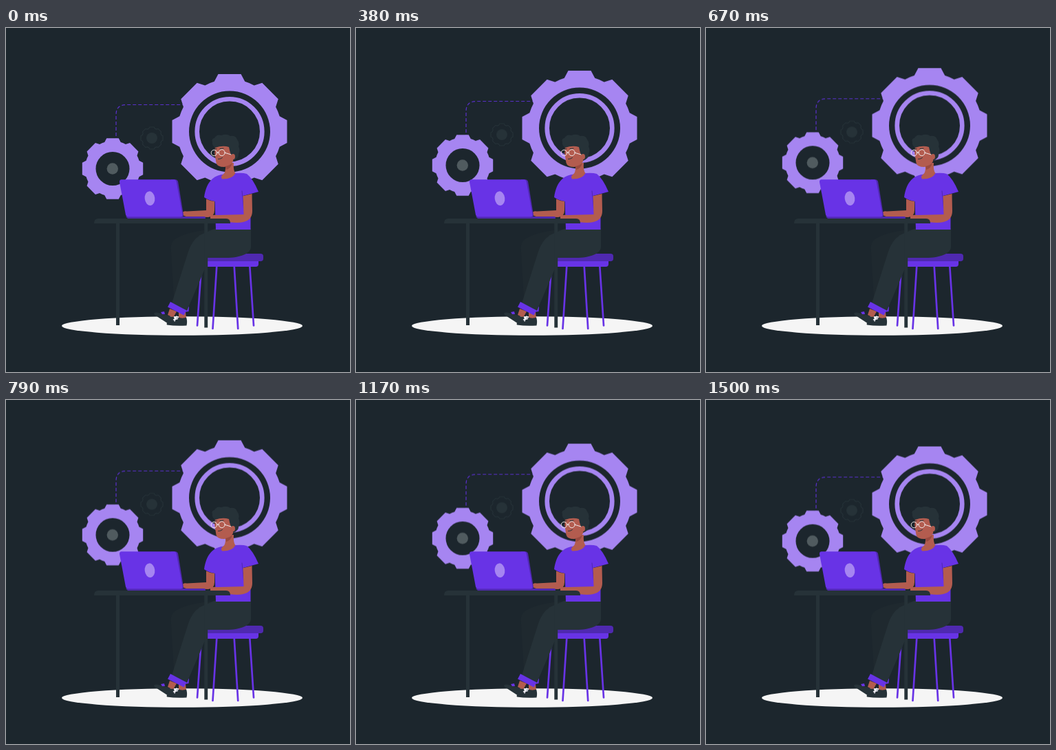
An HTML page that plays this animation: 500 px wide and 500 px high, repeating every 1.54 s.

```html
<!DOCTYPE html>
<html lang="en">
<head>
<meta charset="utf-8">
<title>Working at a laptop</title>
<style>
  html, body { margin: 0; width: 100%; height: 100%; overflow: hidden; background: #1c262d; }
  svg { display: block; width: 100vw; height: 100vh; }
  .violet { fill: #6833e6; }
  .deep { fill: #4f29b0; }
  .lilac { fill: #a685f1; }
  .dark { fill: #263238; }
  .skin { fill: #b35c4f; }
  .bg { fill: #1c262d; }
  .line { fill: none; stroke-linecap: round; stroke-linejoin: round; }
</style>
</head>
<body>
<svg viewBox="0 0 500 500">
  <rect class="bg" width="500" height="500"/>
  <ellipse cx="256" cy="433" rx="175" ry="13.7" fill="#f5f5f5"/>

  <g id="gears">
    <path class="line" d="M160 165V126Q160 111.500 175 111.500H262" stroke="#5a30cc" stroke-width="1.2" stroke-dasharray="5 3" style="stroke-linecap:butt"/>
    <path class="lilac" data-gear="325 150.500 83.500"/>
    <circle class="bg" cx="325" cy="150.500" r="59"/>
    <circle cx="325" cy="150.500" r="47.300" fill="none" stroke="#a685f1" stroke-width="6.600"/>
    <path class="lilac" data-gear="155 204.500 44.200"/>
    <circle class="bg" cx="155" cy="204.500" r="24.500"/>
    <circle cx="154.800" cy="204.500" r="8.200" fill="#505b5f"/>
    <path class="line" data-gear="212 160 16" stroke="#263238" stroke-width="1.2"/>
    <circle class="dark" cx="212" cy="160" r="8"/>
  </g>

  <!-- stool -->
  <path class="line" d="M284 346L278 432.500M306.300 346L300.500 437M331.700 346L337.200 437M354.300 346L360 432.500" stroke="#6833e6" stroke-width="2.700"/>
  <path class="deep" d="M285 328H370Q374 328 374 332V335Q374 339 370 339H285Z"/>
  <path class="violet" d="M285 339H367V343Q367 347 363 347H285Z"/>

  <!-- far leg -->
  <path d="M305 292C280 294 254 299 243 309Q239.500 313 239.700 321L244 395L262 408L290 310Z" fill="#1f292f"/>
  <path class="skin" d="M251 412L261 413L262 423L251 422Z"/>
  <path class="violet" d="M258 405H266L265.500 412L258 413Z"/>
  <path class="dark" d="M233.500 430Q234 427.500 240 426.500L250 420Q256 423 262 420.500Q264 426 262.500 432.500Q246 433.500 234 431.500Z"/>

  <!-- near leg -->
  <path class="skin" d="M238 408L248 412L243 421L235 417Z"/>
  <path class="dark" d="M215 414.500Q218 412.500 223 414.500L235 417.500Q240 421 244 419.500Q246 424 240 431Q237 431.500 233 428L216 417Z"/>
  <path class="line" d="M244.500 420L250.500 420.500M243.500 424L249.500 422.500M245 426L248 419" stroke="#f2f0f8" stroke-width="1.4"/>
  <path class="violet" d="M225 413L230 412L231 416L227 416Z"/>
  <path class="dark" d="M305 291H356V318C356 328 340 334 320 334H293L292.500 342L263 411L241 400L265 325Q270 309 282 301Z"/>
  <path class="violet" d="M239 398L262.500 410.500L258.500 417.500L235 405.500Z"/>

  <!-- torso -->
  <path class="violet" d="M313 213C299 216 291 226 288 246Q295 251 303.500 252L305 293H355.500V262L344.500 244L367 238Q359 219 350 212Q344 210 333 211Z"/>
  <path class="line" d="M343 237L345.500 262" stroke="#4f29b0" stroke-width="1"/>
  <path class="skin" d="M291 248.500Q297 251.700 303 252V265Q303 274 294 275L262 274Q256 273 256.500 269Q257 265.500 263 266.500L291 265Z"/>
  <path class="skin" d="M344.500 244.300L357.500 241L358 266Q358 279 345 282Q333 284.500 315 280L297 277V273Q301 271 308 272L345.500 271Z"/>

  <!-- head -->
  <path class="skin" d="M319 196L331 196Q330 207 333.500 211Q329 220 314 219.500Q311.500 216 315 213Q320 211 319 196Z"/>
  <path class="skin" d="M304 171L329 170L332 188Q329 201 317 202Q307 202 305.500 196L303.300 182Z"/>
  <path d="M319 201Q325 200 329 196Q327 204 320 206Z" fill="#994a40"/>
  <path class="dark" d="M304 174Q299 171 300 166Q298 161 303 160Q306 154 313 156Q321 153 326 157Q334 156 336 162Q340 167 338 172Q341 178 338 183Q339 190 330 193Q331 186 327 184Q325 179 324 173Q315 170 304 174Z"/>
  <ellipse class="skin" cx="330" cy="187" rx="3" ry="4"/>
  <g class="line" stroke="#f0e8e8" stroke-width="1">
    <circle cx="302.500" cy="181.500" r="4.300"/>
    <circle cx="313.700" cy="181.200" r="4.500"/>
    <path d="M306.800 181Q308 180 309.200 181M318.200 181.300L327 184"/>
  </g>
  <path class="line" d="M308.500 190.500Q312 190.800 314.500 188.500M311 175.500L316 175M303.500 176L306 175.500" stroke="#263238" stroke-width="1"/>

  <!-- table and laptop -->
  <path class="dark" d="M160 282H165V432H160ZM288.300 282H293.200V435.500H288.300Z"/>
  <path class="dark" d="M128 284Q128 277 134 277H320Q326 277 326 284Z"/>
  <path class="deep" d="M174 274H288Q290 274 290 277H177Z"/>
  <path class="deep" d="M240 220.300H246Q249.500 220.300 250.200 224L258 272Q258 274.500 255 274.500H245Z"/>
  <path class="violet" d="M168 220.300H244Q247 220.300 247.700 223.500L256.500 271Q257 274.500 253.500 274.500H178Q174.700 274.500 174 271.500L165 224Q164.700 220.300 168 220.300Z"/>
  <ellipse class="lilac" cx="209" cy="247.700" rx="7.300" ry="10.400" transform="rotate(-7 209 247.700)"/>
</svg>
<script>
  // Eight flat teeth joined by shallow arcs.
  function gearPath(cx, cy, r) {
    const at = (angle, radius) =>
      `${(cx + radius * Math.sin(angle)).toFixed(2)} ${(cy - radius * Math.cos(angle)).toFixed(2)}`;
    const tip = Math.atan(0.198), tipR = Math.hypot(r, r * 0.198);
    const root = 17 * Math.PI / 180, rootR = r * 0.91;
    let d = '';
    for (let i = 0; i < 8; i++) {
      const a = i * Math.PI / 4;
      d += i ? `A${rootR} ${rootR} 0 0 1 ` : 'M';
      d += `${at(a - root, rootR)}L${at(a - tip, tipR)}L${at(a + tip, tipR)}L${at(a + root, rootR)}`;
    }
    return d + `A${rootR} ${rootR} 0 0 1 ${at(-root, rootR)}Z`;
  }

  document.querySelectorAll('[data-gear]').forEach(el =>
    el.setAttribute('d', gearPath(...el.dataset.gear.split(' ').map(Number))));

  // Linear float: time in ms, vertical shift in px.
  const LOOP = 1540;
  const steps = [[0, 0], [720, -9.35], [1490, 0.65], [LOOP, 0]];
  document.getElementById('gears').animate(
    steps.map(([t, y]) => ({ offset: t / LOOP, transform: `translateY(${y}px)` })),
    { duration: LOOP, iterations: Infinity, easing: 'linear' }
  );
</script>
</body>
</html>
```
